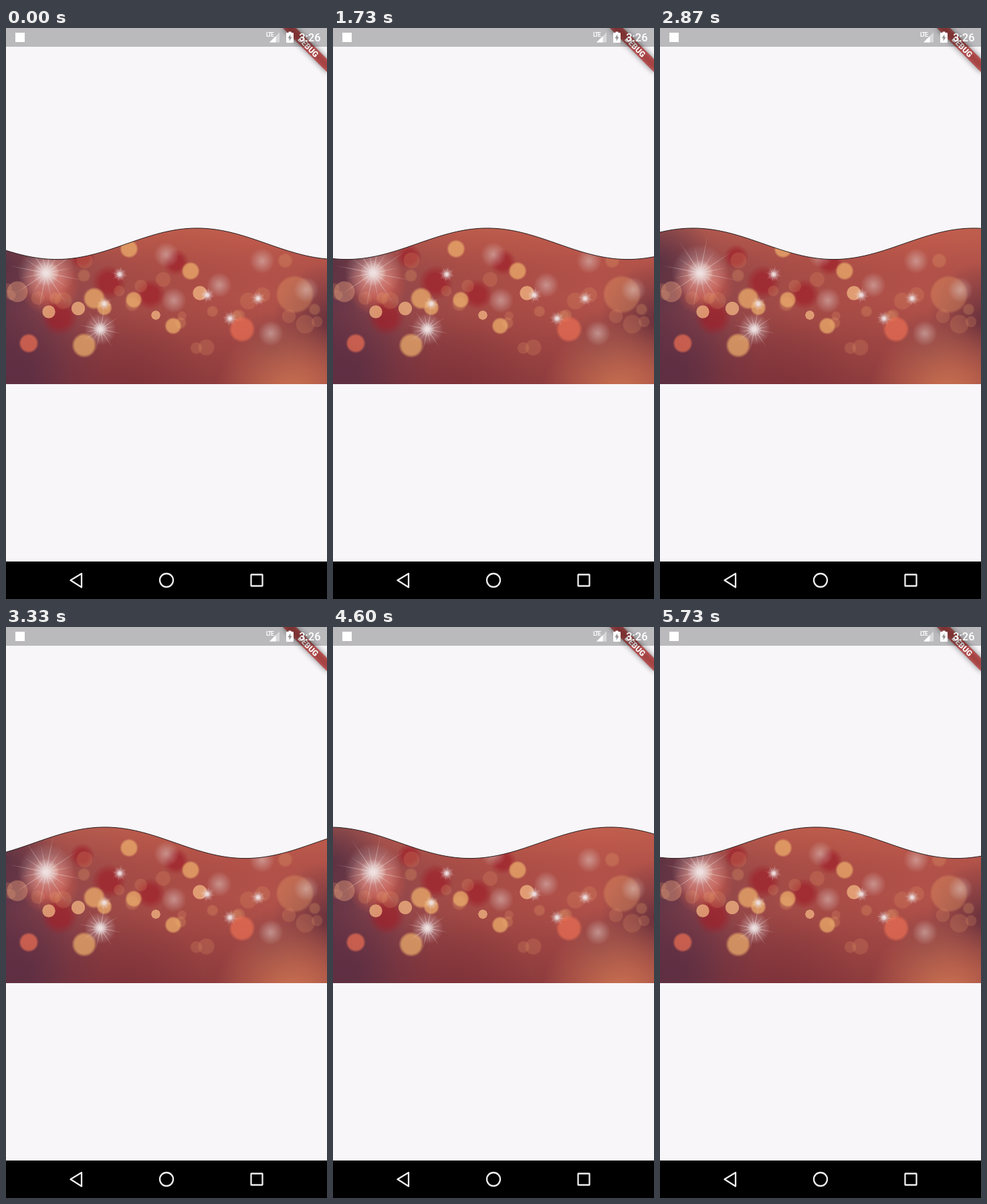
Recreate the animation shown at these times as an HTML page with a canvas. Size 480 by 853 pixels, loop 5.79 s.

```html
<!DOCTYPE html>
<html lang="en">
<head>
<meta charset="utf-8">
<title>Wave over lights</title>
<style>
  html, body { margin: 0; width: 100%; height: 100%; overflow: hidden; background: #f8f6f9; }
  canvas, svg { position: absolute; left: 0; top: 0; display: block; }
  text { font-family: Roboto, "Liberation Sans", sans-serif; fill: #fff; }
</style>
</head>
<body>
<canvas id="lights" width="480" height="853"></canvas>
<svg width="480" height="853" viewBox="0 0 480 853">
  <defs>
    <filter id="soft" x="-30%" y="-200%" width="160%" height="500%"><feGaussianBlur stdDeviation="4.3"/></filter>
  </defs>
  <path id="wave" fill="#f8f6f9" stroke="#2a2022"/>

  <g transform="translate(480) rotate(45)">
    <rect x="-46.7" y="32.7" width="93.4" height="14" opacity=".5" filter="url(#soft)"/>
    <rect x="-46.7" y="32.7" width="93.4" height="14" fill="#b71c1c" fill-opacity=".63"/>
    <text y="44" font-size="11.9" font-weight="900" text-anchor="middle">DEBUG</text>
  </g>

  <rect width="480" height="28" opacity=".25"/>
  <g fill="#fff">
    <rect x="14" y="7" width="14" height="14"/>
    <text x="389" y="13" font-size="8.4" font-weight="700" letter-spacing="-.9">LTE</text>
    <path d="M409 6.5V21.5H394Z" opacity=".45"/>
    <path d="M403.5 12V21.5H394Z"/>
    <path d="M422.5 5.5h4v1.5h2.5q1 0 1 1v13q0 1-1 1h-9q-1 0-1-1v-13q0-1 1-1h2.5Z"/>
    <path d="M425.3 9.5V13.5H427.5L423.7 19.5V15.3H421.5Z" fill="#8f8f8f"/>
    <text x="470.5" y="20" font-size="16.4" font-weight="500" text-anchor="end">3:26</text>
  </g>

  <rect y="797" width="480" height="56"/>
  <g fill="none" stroke="#eee" stroke-width="2.3">
    <path d="M96.5 825L113 815V835.5Z" stroke-linejoin="round"/>
    <circle cx="240" cy="825" r="10"/>
    <rect x="366.5" y="816.5" width="17" height="17" rx=".5"/>
  </g>
</svg>
<script>
const ctx = document.getElementById('lights').getContext('2d');
const wave = document.getElementById('wave');
const TOP = 264, BOTTOM = 532;

let seed = 11;
function random(min, max) {
  seed = seed * 16807 % 2147483647;
  return min + (max - min) * seed / 2147483647;
}

function shade(x1, y1, ...colors) {
  const g = ctx.createLinearGradient(0, TOP, x1, y1);
  colors.forEach((c, i) => g.addColorStop(i / (colors.length - 1), c));
  ctx.fillStyle = g;
  ctx.fillRect(0, TOP, 480, BOTTOM - TOP);
}

// Disc with a flat centre up to `core` (0..1) that fades out at the rim.
function disc(x, y, r, rgb, alpha, core = 0) {
  const g = ctx.createRadialGradient(x, y, 0, x, y, r);
  g.addColorStop(core, `rgba(${rgb},${alpha})`);
  g.addColorStop(1, `rgba(${rgb},0)`);
  ctx.fillStyle = g;
  ctx.beginPath();
  ctx.arc(x, y, r, 0, 7);
  ctx.fill();
}

// Lights strewn along the middle of the picture, denser near its axis.
function scatter(count, rMin, rMax, rgb, alpha, core) {
  for (let i = 0; i < count; i++) {
    const x = (i + random(.1, .9)) / count * 480;
    const y = 410 + random(-45, 45) + random(-45, 45);
    disc(x, y, random(rMin, rMax), rgb, alpha, core);
  }
}

// Soft glow with thin rays of alternating length.
function star(x, y, r, alpha, rays = 16) {
  disc(x, y, r * .75, '228,212,212', alpha * .65);
  disc(x, y, r * .35, '240,238,242', alpha);
  ctx.fillStyle = `rgba(240,224,222,${alpha * .45})`;
  for (let i = 0; i < rays; i++) {
    ctx.save();
    ctx.translate(x, y);
    ctx.rotate((i + .5) / rays * 2 * Math.PI);
    ctx.beginPath();
    ctx.moveTo(0, -1);
    ctx.lineTo(r * (i % 2 ? .7 : 1), 0);
    ctx.lineTo(0, 1);
    ctx.fill();
    ctx.restore();
  }
}

function paintLights() {
  ctx.beginPath();
  ctx.rect(0, TOP, 480, BOTTOM - TOP);
  ctx.clip();

  shade(480, TOP, '#68384a', '#94484a', '#a54c47', '#ac4e47', '#b2524a', '#b0524a');
  shade(0, BOTTOM, 'rgba(214,116,86,.75)', 'rgba(200,96,76,.35)', 'rgba(150,60,60,0)',
    'rgba(110,40,52,.25)', 'rgba(110,40,52,.5)');
  disc(0, 350, 80, '84,46,64', .75);
  disc(30, 515, 120, '84,44,68', .65);
  disc(180, 545, 120, '118,44,54', .6);
  disc(485, 435, 85, '88,42,58', .8);
  disc(405, 480, 60, '125,66,72', .6);
  disc(430, 555, 120, '206,116,82', .95, .1);

  disc(65, 384, 46, '228,96,76', .6, .4);
  for (const [x, y, r] of [[154, 380, 26], [216, 398, 23], [80, 432, 28], [254, 350, 20], [114, 342, 19]])
    disc(x, y, r, '158,32,42', .7, .5);

  scatter(18, 7, 15, '230,152,104', .22, .85);
  scatter(9, 8, 12, '236,170,110', .25, .7);
  disc(432, 398, 29, '224,148,98', .4, .85);
  disc(17, 394, 16, '226,152,120', .45, .94);
  for (const [x, y, r] of [[353, 450, 20], [34, 471, 15]])
    disc(x, y, r, '230,108, 82', .75, .75);
  for (const [x, y, r] of [[132, 404, 17], [117, 474, 19], [191, 406, 13], [276, 363, 14],
    [250, 445, 13], [184, 330, 14], [147, 418, 12]])
    disc(x, y, r, '238,176,108', .72, .75);
  for (const [x, y, r] of [[290, 396, 11], [108, 419, 10.5], [64, 424, 10], [224, 429, 7]])
    disc(x, y, r, '242,182,130', .75, .93);

  // Hazy sparkles, then bright ones.
  for (const [x, y] of [[240, 339], [383, 348], [319, 384], [449, 391], [396, 456], [251, 407]])
    disc(x, y, 19, '222,200,196', .55);
  for (const [x, y] of [[170, 368], [147, 412], [301, 399], [377, 404], [335, 434]])
    star(x, y, 13, .9);
  star(60, 366, 57, .9);
  star(141, 450, 32, .95);
}

const LOOP = 5790, STEP = 200 / 3;
const LENGTH = 420, SPEED = .2107; // px, px per ms

function draw(now) {
  let step = Math.floor((now % LOOP + 4) / STEP);
  if (step === 9) step = 8; // one held step
  const crest = 285.5 + SPEED * step * STEP;
  let d = 'M-4 28';
  for (let x = -4; x <= 484; x += 2)
    d += `L${x} ${(322.3 - 23.3 * Math.cos((x - crest) / LENGTH * 2 * Math.PI)).toFixed(2)}`;
  wave.setAttribute('d', d + 'V-4H-4Z');
}

paintLights();
const start = performance.now();
(function tick() {
  draw(performance.now() - start);
  requestAnimationFrame(tick);
})();
</script>
</body>
</html>
```
